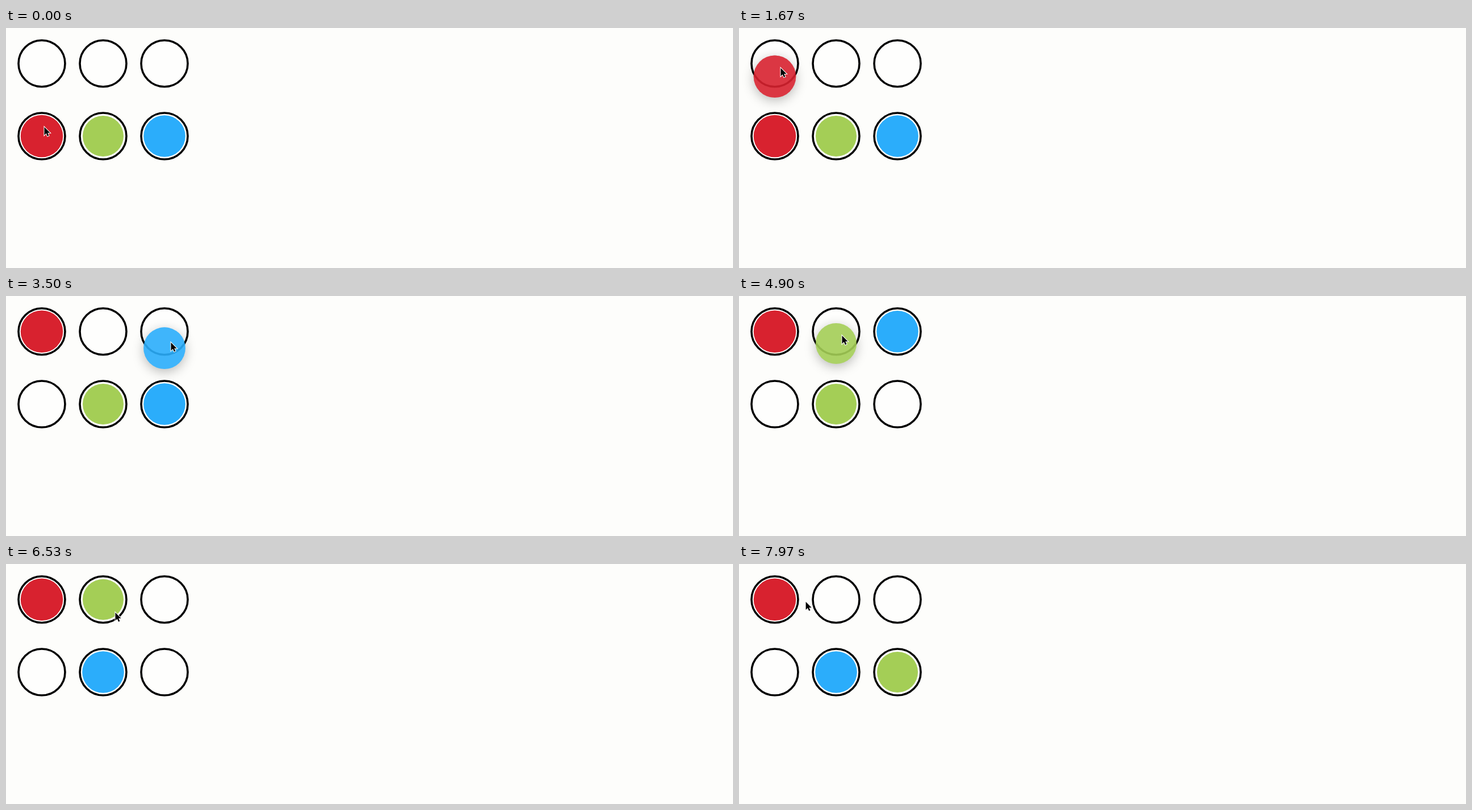
Write an HTML page with a canvas that moves like this. It is 1280 px wide and 424 px high and loops after 8 s.

```html
<!DOCTYPE html>
<html lang="en">
<head>
<meta charset="utf-8">
<title>Drag and drop</title>
<style>
html, body { margin: 0; width: 100%; height: 100%; overflow: hidden; background: #fdfdfb; }
canvas { display: block; }
</style>
</head>
<body>
<canvas width="1280" height="424"></canvas>
<script>
const ctx = document.querySelector('canvas').getContext('2d');
const LOOP = 8000;
const HOLD = 170; // the pointer rests this long before a drag
const FADE = 243;
const RED = { color: '#d8222f', r: 37.3 };
const GREEN = { color: '#a4ce56', r: 36 };
const BLUE = { color: '#2badfb', r: 36.8 };

// Slots 0-2 are the top row, 3-5 the bottom row.
const slots = [0, 1, 2, 3, 4, 5].map(i => ({ x: 63 + 108 * (i % 3), y: i < 3 ? 62.8 : 191 }));
const initial = [null, null, null, RED, GREEN, BLUE];

// dx, dy: where the pointer holds the ball, measured from its centre
const drags = [
  { start: 850, end: 1975, from: 3, to: 0, dx: 10, dy: -16 },
  { start: 2480, end: 3960, from: 5, to: 2, dx: 11, dy: -11 },
  { start: 4300, end: 5110, from: 4, to: 1, dx: 10, dy: -15 },
  { start: 5590, end: 6000, from: 2, to: 4, dx: 7, dy: 10 },
  { start: 6700, end: 7540, from: 1, to: 5, dx: 21, dy: 22 }
];
const first = { x: 67, y: 174 }, last = { x: 115, y: 64 };

const grip = (d, i) => ({ x: slots[i].x + d.dx, y: slots[i].y + d.dy });

// Eased straight move from a to b between the times t0 and t1
function glide(a, b, t0, t1, t) {
  const u = Math.min(1, Math.max(0, (t - t0) / (t1 - t0)));
  const e = u * u * (3 - 2 * u);
  return { x: a.x + (b.x - a.x) * e, y: a.y + (b.y - a.y) * e };
}

function pointer(t) {
  let place = first, since = 0;
  for (const d of drags) {
    const grab = grip(d, d.from), drop = grip(d, d.to);
    if (t < d.start) return glide(place, grab, since, d.start - HOLD, t);
    if (t < d.end) return glide(grab, drop, d.start, d.end, t);
    place = drop;
    since = d.end;
  }
  return glide(place, last, since, LOOP, t);
}

function disc(x, y, r, color) {
  ctx.beginPath();
  ctx.arc(x, y, r, 0, Math.PI * 2);
  ctx.fillStyle = color;
  ctx.fill();
}

function drawSlot({ x, y }, ball) {
  disc(x, y, 41, '#fefefd');
  ctx.lineWidth = 3.6;
  ctx.strokeStyle = '#000';
  ctx.stroke();
  if (ball) disc(x, y, ball.r, ball.color);
}

function drawGhost({ r, color }, x, y, strength) {
  ctx.save();
  ctx.globalAlpha = 0.9 * strength;
  disc(x, y, r, color);
  // The shadow stays outside the see-through ball.
  ctx.beginPath();
  ctx.rect(0, 0, 1280, 424);
  ctx.arc(x, y, r, 0, Math.PI * 2);
  ctx.clip('evenodd');
  ctx.shadowColor = 'rgba(0, 0, 0, 0.3)';
  ctx.shadowBlur = 20;
  ctx.shadowOffsetY = 5;
  disc(x, y, r, color);
  ctx.restore();
}

const arrow = new Path2D('M0 0V17L4 13.2L6.6 19.2L9.4 18L6.8 12.2H12Z');

function drawPointer({ x, y }) {
  ctx.save();
  ctx.translate(x + 0.5, y + 1);
  ctx.scale(0.84, 0.84);
  ctx.lineWidth = 2.4;
  ctx.strokeStyle = '#fff';
  ctx.stroke(arrow);
  ctx.fillStyle = '#000';
  ctx.fill(arrow);
  ctx.restore();
}

function render(t) {
  const tip = pointer(t);
  const balls = initial.slice();
  for (const d of drags) {
    if (t < d.end) break;
    balls[d.to] = balls[d.from];
    balls[d.from] = null;
  }
  ctx.fillStyle = '#fdfdfb';
  ctx.fillRect(0, 0, 1280, 424);
  slots.forEach((slot, i) => drawSlot(slot, balls[i]));
  const drag = drags.find(d => t >= d.start && t < d.end);
  if (drag) {
    const strength = Math.min(1, (t - drag.start) / FADE);
    drawGhost(balls[drag.from], tip.x - drag.dx, tip.y - drag.dy, strength);
  }
  drawPointer(tip);
}

const begin = performance.now();
function tick() {
  render((performance.now() - begin) % LOOP);
  requestAnimationFrame(tick);
}
tick();
</script>
</body>
</html>
```
